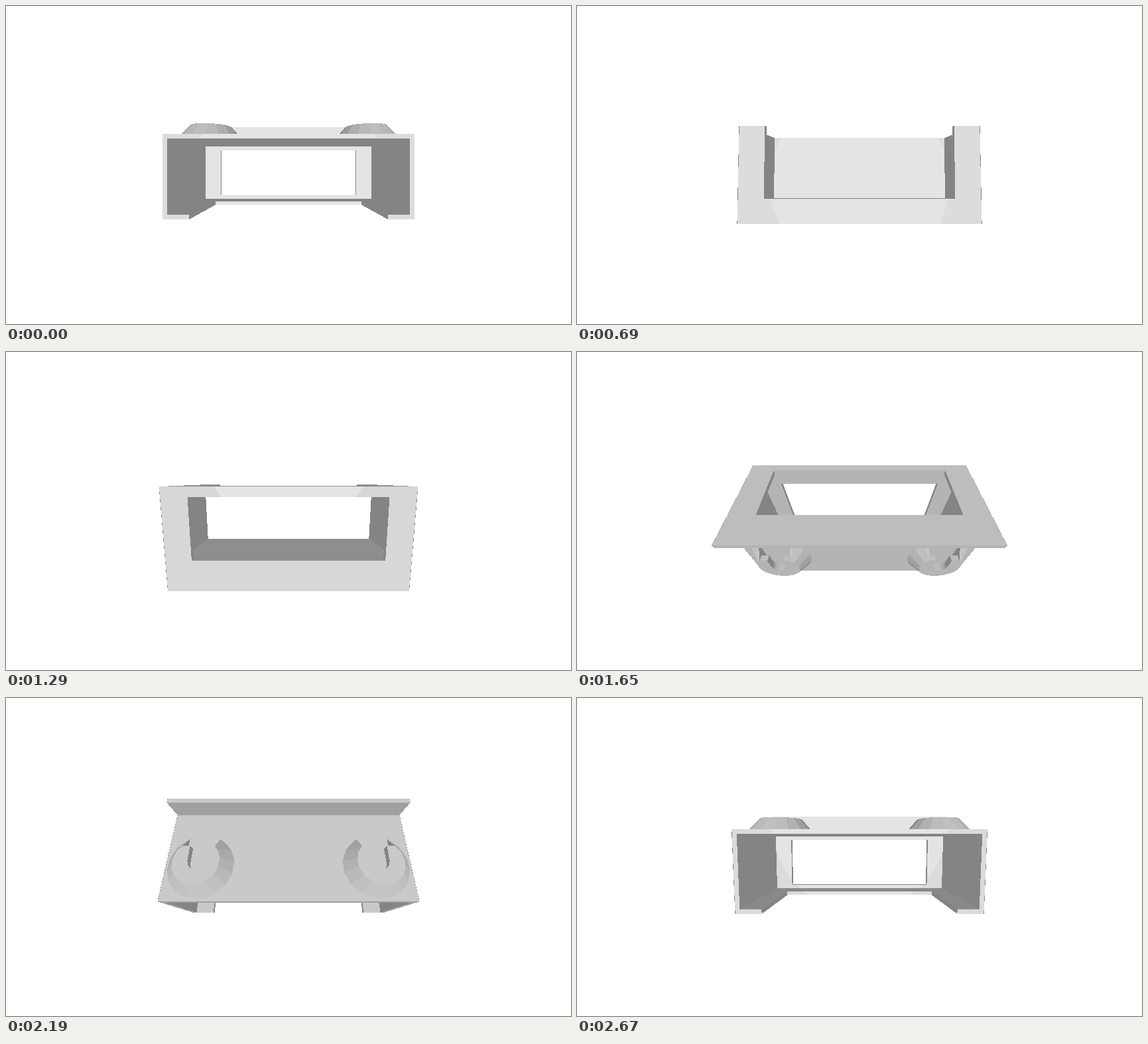
These frames come from a looping animation (852x480 px, 2.7 s). An HTML page with a canvas:

```html
<!DOCTYPE html>
<html>
<head>
<meta charset="utf-8">
<style>
html, body { margin: 0; width: 100%; height: 100%; overflow: hidden; background: #fff; }
canvas { display: block; }
</style>
</head>
<body>
<canvas id="stage" width="852" height="480"></canvas>
<script>
const FOCAL = 318, DIST = 2.08, SHIFT_Y = -0.0935;
// Part of the stage that is rasterised, and the view centre inside it
const LEFT = 196, TOP = 144, W = 460, H = 224;
const CX = 426 - LEFT, CY = 239.5 - TOP;

const quads = [];
const quad = (...corners) => quads.push(corners);

function box(x0, x1, y0, y1, z0, z1) {
  for (const x of [x0, x1]) quad([x, y0, z0], [x, y1, z0], [x, y1, z1], [x, y0, z1]);
  for (const y of [y0, y1]) quad([x0, y, z0], [x1, y, z0], [x1, y, z1], [x0, y, z1]);
  for (const z of [z0, z1]) quad([x0, y0, z], [x1, y0, z], [x1, y1, z], [x0, y1, z]);
}

// Housing: half sizes, inner faces, opening and flange
const HY = 0.34, HZ = 0.407, IN_X = 0.963, IN_Y = 0.303, IN_Z = 0.37;
const OPEN = 0.787, WINDOW = 0.26, CUT_Z = -0.201, FLANGE = 0.525;

box(-1, 1, IN_Y, HY, -HZ, HZ);
box(-1, 1, -HY, -WINDOW, -HZ, -IN_Z);
box(-1, 1, WINDOW, FLANGE, -HZ, -IN_Z);
box(-OPEN, OPEN, -HY, -IN_Y, -HZ, CUT_Z);

function mound(side) {
  const base = 0.272, top = 0.182, height = 0.105, notch = 0.13, slot = 0.065, lip = 0.055;
  const yt = HY + height;
  const at = (dx, y, dz) => [side * (0.715 + dx), y, 0.115 + dz];
  const baseEnd = Math.PI - Math.asin(notch / base);
  const topEnd = Math.PI - Math.asin(notch / top);
  const back = -Math.sqrt(top * top - notch * notch);
  const backBase = -Math.sqrt(base * base - notch * notch);
  const ring = (angle, r, y, end) => {
    const a = Math.max(-end, Math.min(end, angle));
    return at(r * Math.sin(a), y, r * Math.cos(a));
  };

  const seg = Math.PI / 8;
  for (let i = -9; i < 9; i++) {
    const a = i * seg - 0.157, b = a + seg;
    if (b <= -baseEnd || a >= baseEnd) continue;
    quad(ring(a, base, HY, baseEnd), ring(b, base, HY, baseEnd),
         ring(b, top, yt, topEnd), ring(a, top, yt, topEnd));
  }

  // Top disc in strips that leave the slot open
  const arc = (r, x) => Math.sqrt(Math.max(0, r * r - x * x));
  const step = top / 14;
  for (let i = -14; i < 14; i++) {
    const a = i * step, b = a + step;
    const low = x => Math.abs(a + b) / 2 < slot ? arc(slot, x) : Math.max(back, -arc(top, x));
    quad(at(a, yt, low(a)), at(b, yt, low(b)), at(b, yt, arc(top, b)), at(a, yt, arc(top, a)));
  }

  // U-shaped wall: the slot through the lip, and the wider pocket below it
  function channel(r, y0, y1) {
    let p = [-r, back];
    for (let i = 0; i <= 13; i++) {
      const a = Math.PI * i / 12;
      const q = i > 12 ? [r, back] : [-r * Math.cos(a), r * Math.sin(a)];
      quad(at(p[0], y1, p[1]), at(q[0], y1, q[1]), at(q[0], y0, q[1]), at(p[0], y0, p[1]));
      p = q;
    }
  }
  channel(slot, yt - lip, yt);
  channel(notch, HY, yt - lip);

  for (const s of [-1, 1]) {
    const n = s * notch, m = s * slot, corner = at(n, HY, back);
    quad(at(n, yt, back), at(n, HY, backBase), corner, corner);
    quad(at(m, yt - lip, back), at(n, yt - lip, back), at(n, yt, back), at(m, yt, back));
  }
}

for (const s of [-1, 1]) {
  box(s * IN_X, s, -HY, HY, -HZ, HZ);
  box(s * OPEN, s, -HY, HY, -HZ, -IN_Z);
  box(s * OPEN, s, -HY, -IN_Y, -HZ, HZ);
  // Thin dark rim along the outer sides
  const e = s * 1.002;
  quad([e, -HY, -HZ], [e, HY, -HZ], [e, HY, HZ], [e, -HY, HZ]);
  quad([e, HY, -HZ], [e, FLANGE, -HZ], [e, FLANGE, -IN_Z], [e, HY, -IN_Z]);
  mound(s);
}

const ctx = document.getElementById('stage').getContext('2d');
const image = ctx.createImageData(W, H);
const pixels = new Uint32Array(image.data.buffer);
const depth = new Float32Array(W * H);

const sub = (a, b) => a.map((v, i) => v - b[i]);
const dot = (a, b) => a[0] * b[0] + a[1] * b[1] + a[2] * b[2];
const cross = (a, b) => [a[1] * b[2] - a[2] * b[1], a[2] * b[0] - a[0] * b[2], a[0] * b[1] - a[1] * b[0]];
const grey = v => (0xff000000 | Math.round(v) * 0x10101) >>> 0;
const LIGHT = grey(228);

function project([x, y, z]) {
  const w = 1 / (DIST - z);
  return [CX + FOCAL * x * w, CY - FOCAL * y * w, w];
}

// Flat shade, mirrored light direction and the cosine limit of the highlight
function shade(points) {
  let n = cross(sub(points[2], points[0]), sub(points[3], points[1]));
  const len = Math.hypot(...n) || 1;
  const facing = dot(n, sub([0, 0, DIST], points[0])) < 0 ? -1 : 1;
  n = n.map(v => v * facing / len);
  const nz = Math.max(0, n[2]);
  return {
    color: grey(132 + 74 * nz + 14 * nz ** 40),
    mirror: [2 * nz * n[0], 2 * nz * n[1], 2 * nz * nz - 1],
    limit: 0.917 + 0.1 * Math.sqrt(Math.max(0, 1 - nz * nz))
  };
}

function triangle(a, b, c, { color, mirror, limit }) {
  const area = (b[0] - a[0]) * (c[1] - a[1]) - (b[1] - a[1]) * (c[0] - a[0]);
  if (Math.abs(area) < 1e-6) return;
  const xs = [a[0], b[0], c[0]], ys = [a[1], b[1], c[1]];
  const x0 = Math.max(0, Math.floor(Math.min(...xs))), x1 = Math.min(W - 1, Math.ceil(Math.max(...xs)));
  const y0 = Math.max(0, Math.floor(Math.min(...ys))), y1 = Math.min(H - 1, Math.ceil(Math.max(...ys)));
  for (let y = y0; y <= y1; y++) {
    const py = y + 0.5, vy = (py - CY) / FOCAL;
    for (let x = x0; x <= x1; x++) {
      const px = x + 0.5;
      const u = ((c[0] - b[0]) * (py - b[1]) - (c[1] - b[1]) * (px - b[0])) / area;
      const v = ((a[0] - c[0]) * (py - c[1]) - (a[1] - c[1]) * (px - c[0])) / area;
      const t = 1 - u - v;
      if (u < 0 || v < 0 || t < 0) continue;
      const w = u * a[2] + v * b[2] + t * c[2], i = y * W + x;
      if (w <= depth[i]) continue;
      depth[i] = w;
      const vx = (CX - px) / FOCAL;
      const gloss = (vx * mirror[0] + vy * mirror[1] + mirror[2]) / Math.sqrt(vx * vx + vy * vy + 1);
      pixels[i] = gloss > limit ? LIGHT : color;
    }
  }
}

function render(angle) {
  const c = Math.cos(angle), s = Math.sin(angle);
  const turn = ([x, y, z]) => [x, y * c + z * s + SHIFT_Y, z * c - y * s];
  pixels.fill(0xffffffff);
  depth.fill(0);
  for (const q of quads) {
    const points = q.map(turn), look = shade(points), p = points.map(project);
    triangle(p[0], p[1], p[2], look);
    triangle(p[0], p[2], p[3], look);
  }
  ctx.putImageData(image, LEFT, TOP);
}

const STEP = 30, STEPS = 90;
let shown = -1, start;
function tick(now) {
  start ??= now;
  const step = Math.floor((now - start) / STEP) % STEPS;
  if (step !== shown) render((shown = step) * 2 * Math.PI / STEPS);
  requestAnimationFrame(tick);
}
requestAnimationFrame(tick);
</script>
</body>
</html>
```
